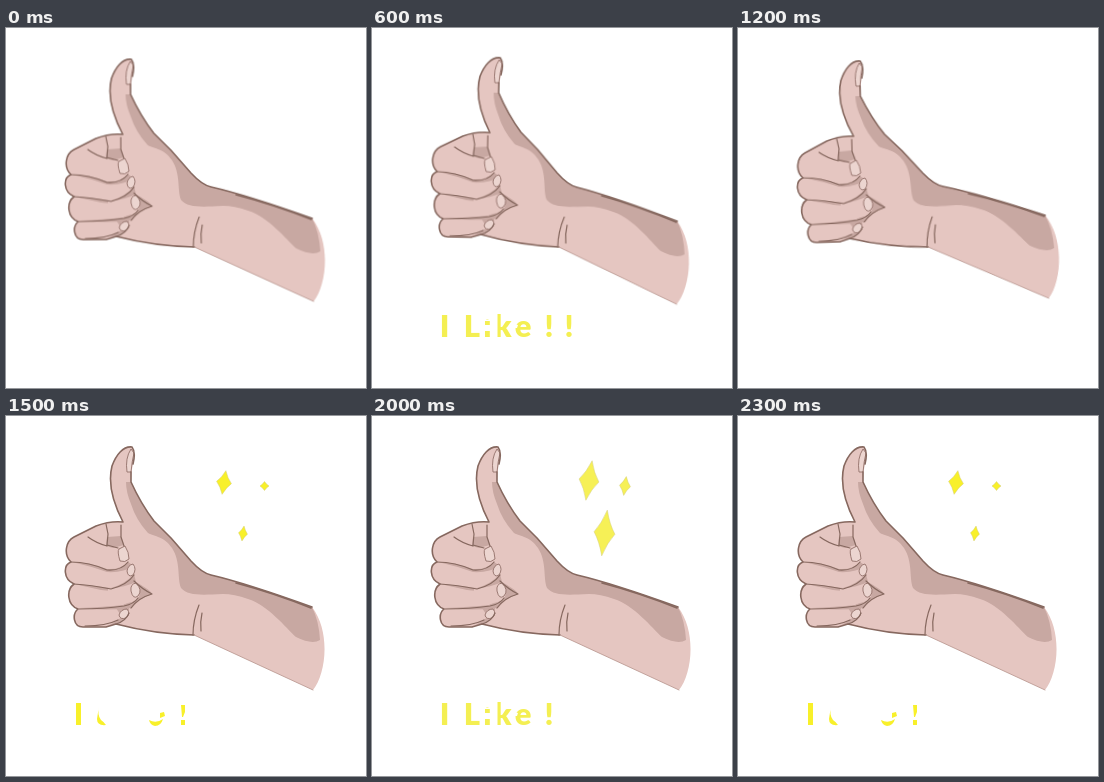
An HTML page that plays this animation: 360 px wide and 360 px high, repeating every 2.4 s.

```html
<!DOCTYPE html>
<html lang="en">
<head>
<meta charset="utf-8">
<title>I Like !</title>
<style>
html, body { margin: 0; width: 100%; height: 100%; overflow: hidden; background: #fff; }
svg { display: block; width: 100vw; height: 100vh; }

.hand { transform-origin: 189px 152px; animation: tilt 2.4s step-end infinite; }
.skin { fill: #e5c6c1; }
.shade { fill: #c8a8a2; }
.nail { fill: #ecd5d0; stroke: #927069; stroke-width: .9; }
.line { fill: none; stroke: #86685f; stroke-width: 1.2; stroke-linecap: round; stroke-linejoin: round; }
.edge { stroke-width: 1.6; }
.soft { stroke: #b7938c; stroke-width: .8; }

text { font: 900 31px Lato, "Open Sans", sans-serif; text-anchor: middle; fill: #f4ef52; stroke-linejoin: round; }
.bold text { stroke: #f4ef52; stroke-width: 1.6; }
.patch { fill: #fff; }
.star { fill: #f6f056; stroke: #d2cc78; stroke-width: .5; }
.small { fill: #f8f02a; }

.words { animation: words 2.4s step-end infinite; }
.second { animation: second 2.4s step-end infinite; }
.bold { animation: bold 2.4s step-end infinite; }
.twinkle { animation: gate 2.4s step-end infinite; }
.big { animation: big .4s step-end infinite; }
.mid { animation: mid .4s step-end infinite; }
.small { animation: small .4s step-end infinite; }

@keyframes tilt {
  0% { transform: rotate(-.3deg); }
  12.5% { transform: rotate(.9deg); }
  25% { transform: rotate(1.1deg); }
  37.5% { transform: rotate(5.6deg); }
  50% { transform: rotate(-1.8deg); }
  62.5%, 100% { transform: rotate(0deg); }
}
@keyframes words { 0%, 37.5%, 100% { opacity: 0; } 12.5% { opacity: 1; } }
@keyframes second { 0%, 37.5%, 100% { opacity: 0; } 25% { opacity: 1; } }
@keyframes bold { 0%, 50%, 100% { opacity: 0; } 37.5% { opacity: 1; } }
@keyframes gate { 0% { opacity: 0; } 62.5%, 100% { opacity: 1; } }
@keyframes big { 0% { opacity: 1; } 50%, 100% { opacity: 0; } }
@keyframes mid { 0%, 75%, 100% { opacity: 0; } 50% { opacity: 1; } }
@keyframes small { 0% { opacity: 0; } 75%, 100% { opacity: 1; } }
</style>
</head>
<body>
<svg viewBox="0 0 360 360">
  <defs>
    <path id="spark" d="M0-1Q.38-.4 1 0Q.38.4 0 1Q-.38.4-1 0Q-.38-.4 0-1Z" vector-effect="non-scaling-stroke"/>
    <text id="like" x="72.5 86 100 115.5 131 151 164 177" y="309">I Like !</text>
    <text id="bang" y="309">!</text>
    <g id="worn">
      <use href="#like"/>
      <path class="patch" d="M119.5 284h6v28h-6zM111 284h8v7h-8zM111 297h8v6h-8zM142 296l4 1-1 3h-4z"/>
    </g>
  </defs>

  <g class="hand">
    <path class="skin" d="M126 31C117 30 110 39 106 50C102 66 105 83 117 106C107 105 98 107 90 110L68 121C60 125 57 138 65 146C57 149 57 163 68 168C60 174 61 189 72 193C66 198 67 211 77 211L100 211L110 208Q148 218 188 219L307 274C320 258 325 216 306 191C270 178 235 166 205 159Q196 157 185 145L165 122L148 105Q135 88 125 66C125 53 130 38 126 31Z"/>

    <path class="shade" d="M125 66Q135 88 148 105L165 122L185 145Q196 157 205 159C235 166 270 178 306 191Q313 205 314 224Q306 229 290 221C280 212 262 189 242 183Q228 178 217 178C195 179 182 180 175 172C171 162 175 146 166 132C158 120 149 121 142 117Q130 104 125 88Q120 76 120 66Z"/>
    <path class="shade" d="M101 121L115 120L118 129L107 132L100 130Z"/>
    <path class="shade" d="M66 146Q83 146 101 153Q114 154 122 146L128 150Q117 157 101 156Q84 150 66 146Z"/>
    <path class="shade" d="M68 168Q84 169 105 172Q119 168 128 158L130 166Q146 175 146 178Q134 182 126 192Q100 195 73 192Q98 191 117 189L133 180L128 168Q113 177 95 174Z"/>
    <path class="shade" d="M110 192L123 192L123 197Q116 208 104 209L116 201Z"/>

    <path class="skin" d="M102 173Q120 171 130 166Q137 177 131 184Q118 190 102 189Z"/>

    <g class="nail">
      <path d="M114 145Q111 135 113 133L119 130Q123 136 123 143Q119 147 114 145Z"/>
      <path d="M121 155Q122 149 127 148Q131 153 127 159Q122 162 121 155Z"/>
      <path d="M125 175Q124 168 130 167Q137 174 132 180Q127 184 125 175Z"/>
      <path d="M113 199Q115 193 121 193Q125 198 120 202Q114 204 113 199Z"/>
      <path d="M125 33Q119 42 121 56L125 56Q126 45 128 37Z"/>
    </g>

    <g class="line">
      <path class="edge" d="M125 56V66Q135 88 148 105L165 122L185 145Q196 157 205 159C235 166 270 178 306 191M126 31C117 30 110 39 106 50C102 66 105 83 117 106C107 105 98 107 90 110L68 121C60 125 57 138 65 146C57 149 57 163 68 168C60 174 61 189 72 193C66 198 67 211 77 211L100 211L110 208Q148 218 188 219M126 31Q130 36 127 48"/>
      <path class="edge" d="M230 167C260 175 285 184 305 192"/>
      <path d="M65 146Q83 146 101 154Q115 155 122 146M68 168Q85 169 105 173Q121 169 128 159M73 193Q98 193 118 190Q128 188 132 182M79 210Q100 210 112 204M100 108L102 118L101 129L112 132M115 109L115 121L118 130M101 130Q90 127 82 121M128 165Q136 173 146 178Q132 182 125 192M123 197Q120 205 110 208"/>
      <path d="M193 189Q187 204 187 219M196 197Q194 206 195 215"/>
      <path class="soft" d="M188 219L307 274"/>
    </g>
  </g>

  <use class="words" href="#worn"/>
  <use class="second" href="#bang" x="197"/>
  <g class="bold">
    <use href="#like"/>
    <use href="#bang" x="197"/>
    <use href="#bang" x="218"/>
  </g>

  <g class="twinkle">
    <g class="star big">
      <use href="#spark" transform="translate(217 64.5) rotate(9) scale(10 20)"/>
      <use href="#spark" transform="translate(253 70) rotate(8) scale(5.5 9.5)"/>
      <use href="#spark" transform="translate(232.5 117) rotate(7) scale(10.5 23)"/>
    </g>
    <use class="big" href="#worn"/>

    <g class="star mid">
      <use href="#spark" transform="translate(217 65) rotate(9) scale(8 15)"/>
      <use href="#spark" transform="translate(255 70) rotate(8) scale(4.5 6.5)"/>
      <use href="#spark" transform="translate(235 117) rotate(7) scale(7 15)"/>
    </g>
    <use class="mid" href="#worn"/>

    <g class="star small">
      <use href="#spark" transform="translate(218 66.5) rotate(9) scale(7.5 12)"/>
      <use href="#spark" transform="translate(258.5 70) scale(4.5 4.5)"/>
      <use href="#spark" transform="translate(237 117.5) rotate(8) scale(4.5 7.5)"/>
      <path stroke="none" d="M70 287h5v22h-5zM93 290Q91 299 95 304Q98 306 100 309Q91 310 91 303ZM143 304Q150 308 157 303Q155 310 149 310Q144 309 143 304ZM154 297l4-1 1 4-5 2zM175 289h4v7l-2 5h-1zM175 304h4v5h-4z"/>
    </g>
  </g>
</svg>
</body>
</html>
```
